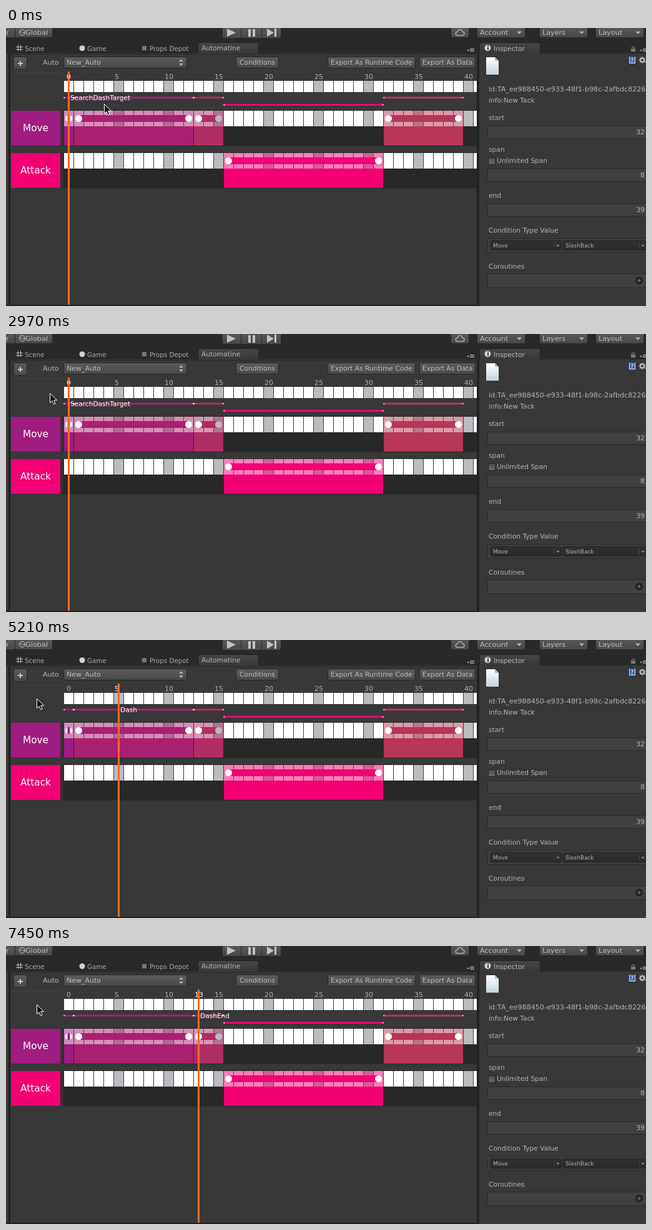
Recreate the animation shown at these times as an HTML page with a canvas. Size 1025 px wide and 447 px high, loop 8 s.

```html
<!DOCTYPE html>
<html lang="en">
<head>
<meta charset="utf-8">
<title>Timeline editor</title>
<style>
html, body { margin: 0; width: 100%; height: 100%; overflow: hidden; background: #383838; }
canvas { display: block; }
</style>
</head>
<body>
<canvas id="stage" width="1025" height="447"></canvas>
<script>
const W = 1025, H = 447, LOOP = 8000;
const LEFT = 93, RIGHT = 754, CELL = 16;
const FONT = '"DejaVu Sans", Verdana, sans-serif';
const screen = document.getElementById('stage').getContext('2d');

const spans = [
  { from: 0, to: 0, color: '#a01c80', row: 133, strip: 112 },
  { from: 1, to: 12, color: '#a92070', row: 133, strip: 112 },
  { from: 13, to: 15, color: '#b02c64', row: 133, strip: 112 },
  { from: 32, to: 39, color: '#b83656', row: 133, strip: 112 },
  { from: 16, to: 31, color: '#f20074', row: 201, strip: 123.5 }
];

// pointer: time, x, y
const pointer = [
  [0, 157, 122], [150, 162, 122], [300, 178, 121], [450, 196, 119],
  [590, 209, 118], [740, 216, 117], [1480, 175, 122], [1630, 125, 124],
  [1780, 92, 123], [1920, 74, 120], [2070, 60, 112], [2220, 66, 104],
  [2370, 82, 99], [2520, 96, 97], [2970, 70, 95], [3120, 49, 94]
];
const ticks = [3860, 4310, 4610, 4910, 5210, 5510, 5810, 6100, 6400, 6700, 7000, 7150, 7450];

let g;
const cellX = n => LEFT + CELL * n;

function rect(x, y, w, h, color) {
  g.fillStyle = color;
  g.fillRect(x, y, w, h);
}

function text(s, x, y, color = '#b4b4b4', size = 10.7, align = 'left') {
  g.font = size + 'px ' + FONT;
  g.textAlign = align;
  g.fillStyle = color;
  g.fillText(s, x, y);
}

function dot(x, y, r, color) {
  g.fillStyle = color;
  g.beginPath();
  g.arc(x, y, r, 0, Math.PI * 2);
  g.fill();
}

function poly(points, color) {
  g.fillStyle = color;
  g.beginPath();
  points.forEach(([x, y]) => g.lineTo(x, y));
  g.closePath();
  g.fill();
}

function fade(y, h, top, bottom) {
  const f = g.createLinearGradient(0, y, 0, y + h);
  f.addColorStop(0, top);
  f.addColorStop(1, bottom);
  return f;
}

function button(x, y, w, h, top = '#5c5c5c', bottom = '#484848') {
  g.beginPath();
  g.roundRect(x + .5, y + .5, w - 1, h - 1, 3);
  g.fillStyle = fade(y, h, top, bottom);
  g.fill();
  g.strokeStyle = '#272727';
  g.lineWidth = 1;
  g.stroke();
}

function tab(x, w) {
  g.beginPath();
  g.roundRect(x + .5, 23.5, w, 20, [3, 3, 0, 0]);
  g.fillStyle = fade(23, 18, '#464646', '#383838');
  g.fill();
  g.strokeStyle = '#202020';
  g.lineWidth = 1;
  g.stroke();
}

const arrow = (x, y, s, color = '#b0b0b0') =>
  poly([[x - s, y - s / 2], [x + s, y - s / 2], [x, y + s / 2 + .5]], color);

function menu(x, y) {
  arrow(x, y, 2);
  for (let i = 0; i < 3; i++) rect(x + 3, y - 3 + i * 2, 7, 1, '#b0b0b0');
}

function toolbar() {
  rect(0, 0, W, 22, '#292929');
  button(-6, -6, 22, 22);
  text('r', 0, 11, '#b4b4b4', 11.2);
  button(14, -6, 61, 22);
  g.strokeStyle = '#c8c8c8';
  g.lineWidth = 1;
  g.beginPath();
  g.arc(26, 7, 4.5, 0, 7);
  g.moveTo(22, 6); g.lineTo(30, 8);
  g.stroke();
  dot(25, 6, 1.5, '#b04c40');
  text('Global', 31, 11, '#c0c0c0', 11.3);

  button(346, -6, 95, 23);
  rect(376, 0, 1, 16, '#2c2c2c');
  rect(409, 0, 1, 16, '#2c2c2c');
  poly([[354, 1], [368, 7.5], [354, 14]], '#c4c4c4');
  rect(388, 2, 4, 12, '#c4c4c4');
  rect(395, 2, 4, 12, '#c4c4c4');
  poly([[418, 1], [429, 7.5], [418, 14]], '#c4c4c4');
  rect(430, 1, 3, 13, '#c4c4c4');

  button(712, -6, 30, 22);
  g.strokeStyle = '#c0c0c0';
  g.lineWidth = 1.2;
  g.beginPath();
  g.arc(723, 9, 2.8, Math.PI / 2, Math.PI * 1.5);
  g.arc(727, 6.3, 3.8, Math.PI * 1.05, Math.PI * 1.95);
  g.arc(731.3, 9.1, 2.7, -Math.PI / 2, Math.PI / 2);
  g.closePath();
  g.stroke();
  [['Account', 754], ['Layers', 854], ['Layout', 944]].forEach(([s, x]) => {
    button(x, -6, 78, 22);
    text(s, x + 5, 11, '#bebebe', 11.2);
    arrow(x + 68, 7.5, 4);
  });
}

function tabs() {
  rect(0, 22, W, 19, '#292929');
  tab(307, 97);
  tab(758, 97);
  for (let i = 0; i < 2; i++) {
    rect(19 + i * 4, 27, 1, 10, '#c0c0c0');
    rect(16, 30 + i * 4, 11, 1, '#c0c0c0');
  }
  text('Scene', 30, 37, '#a8a8a8', 10.3);
  dot(122, 32.5, 4.5, '#d0d0d0');
  text('Game', 130, 37, '#a8a8a8', 10.3);
  rect(218, 29, 7, 7, '#777');
  text('Props Depot', 230, 37, '#a8a8a8', 10.3);
  text('Automatine', 313, 36, '#b8b8b8');
  dot(771.5, 32, 5, '#d4d4d4');
  rect(771, 31, 2, 4, '#333');
  rect(771, 28, 2, 2, '#333');
  text('Inspector', 781, 37, '#b8b8b8');
  menu(740, 36);
  menu(1017, 36);
  rect(1001, 33, 7, 5, '#777');
  g.strokeStyle = '#777';
  g.lineWidth = 1.2;
  g.beginPath();
  g.arc(1004.5, 32.5, 2.3, Math.PI, 0);
  g.stroke();
}

function cells(y, h) {
  rect(LEFT, y, RIGHT - LEFT, h, '#3a3a42');
  for (let n = 0; cellX(n) < RIGHT; n++)
    rect(cellX(n), y, Math.min(CELL - 1, RIGHT - cellX(n)), h, n && n % 5 === 0 ? '#bbbbc0' : '#fff');
}

function track(name, y, color) {
  rect(7, y - 1, RIGHT - 7, 58, '#282828');
  rect(7, y - 1, 85, 58, '#333');
  rect(8, y, 79, 56, color);
  text(name, 47.5, y + 33, '#fff', 15.3, 'center');
  cells(y, 25);
}

function drawSpan({ from, to, color, row, strip }) {
  const x = cellX(from), w = (to - from + 1) * CELL - 1;
  const a = x + 7.5, b = cellX(to) + 7.5, y = row + 12.5;
  g.globalAlpha = .5;
  rect(x, row, w, 25, color);
  g.globalAlpha = 1;
  rect(x, row + 25, w, 31, color);
  if (from === to) {
    dot(a, y, 5.5, '#fff');
    rect(a - 2, y - 5.5, 4, 11, color);
  } else {
    rect(a, y - 5.5, b - a, 11, color);
    dot(a, y, 5.5, '#fff');
    dot(b, y, 5.5, to === 15 ? '#bbbbc0' : '#fff');
  }
  rect(x, strip - 1.5, w, 3, color);
  rect(x - .5, strip - 1, 1.5, 2, '#fff');
  rect(x + w - 1, strip - 1, 1.5, 2, '#fff');
}

function editor() {
  rect(7, 41, 747, 404, '#383838');
  g.strokeStyle = '#2a2a2a';
  g.lineWidth = 1;
  g.strokeRect(9.5, 42.5, 745, 30);
  rect(10, 72, 82, 1, '#444');
  rect(93, 70, 661, 15, '#383838');
  button(12, 46, 22, 21);
  rect(19, 56, 8, 2, '#c4c4c4');
  rect(22, 53, 2, 8, '#c4c4c4');
  text('Auto', 59, 59, '#b4b4b4', 11);
  button(92, 46, 198, 19);
  text('New_Auto', 97, 59, '#bebebe', 11);
  poly([[277, 54], [284, 54], [280.5, 50]], '#b0b0b0');
  poly([[277, 57], [284, 57], [280.5, 61]], '#b0b0b0');
  [['Conditions', 368, 69], ['Export As Runtime Code', 515, 141], ['Export As Data', 662, 90]]
    .forEach(([s, x, w]) => {
      button(x, 46, w, 19);
      text(s, x + w / 2, 59, '#bebebe', 10.75, 'center');
    });
  cells(85, 18);
  track('Move', 133, '#a01c80');
  track('Attack', 201, '#f20074');
  spans.forEach(drawSpan);
}

function field(y, h, value) {
  rect(771, y, 254, h, '#2a2a2a');
  rect(772, y + 1, 253, h - 2, '#404040');
  if (value) text(value, 1023, y + 14, '#b4b4b4', 10.9, 'right');
}

function inspector() {
  rect(758, 41, 267, 406, '#383838');
  poly([[769, 47], [783, 47], [789, 53], [789, 75], [769, 75]], fade(47, 28, '#fff', '#c3d5df'));
  poly([[783, 47], [789, 53], [783, 53]], '#aebfca');
  rect(998, 46, 10, 11, '#dfe6f0');
  rect(999, 46, 8, 10, '#3b68b0');
  text('?', 1003, 55, '#fff', 9, 'center');
  g.strokeStyle = '#bcbcbc';
  g.lineWidth = 2;
  g.beginPath();
  g.arc(1019, 51.5, 3, 0, 7);
  for (let a = 0; a < 8; a++) {
    const c = Math.cos(a * Math.PI / 4), s = Math.sin(a * Math.PI / 4);
    g.moveTo(1019 + c * 3, 51.5 + s * 3);
    g.lineTo(1019 + c * 5, 51.5 + s * 5);
  }
  g.stroke();
  arrow(1025, 55, 2);

  text('id:TA_ee988450-e933-48f1-b98c-2afbdc8226', 773, 102, '#b4b4b4', 11.1);
  text('info:New Tack', 773, 120);
  text('start', 773, 148);
  field(157, 21, '32');
  text('span', 773, 199);
  g.fillStyle = fade(208, 11, '#4c4c4c', '#666');
  g.fillRect(773, 208, 11, 11);
  g.strokeStyle = '#242424';
  g.lineWidth = 1;
  g.strokeRect(772.5, 208.5, 11, 11);
  text('Unlimited Span', 786, 217, '#b4b4b4', 10.6);
  field(226, 21, '8');
  text('end', 773, 273);
  field(282, 21, '39');
  text('Condition Type Value', 773, 329);
  field(338, 23);
  [['Move', 775, 115], ['SlashBack', 891, 138]].forEach(([s, x, w]) => {
    button(x, 341, w, 17, '#303030', '#2a2a2a');
    text(s, x + 5, 353, '#b4b4b4', 8.9);
    const end = Math.min(x + w - 6, 1020);
    arrow(end, 350, 2.5, '#999');
    rect(end - 6, 344, 1, 11, '#444');
  });
  text('Coroutines', 773, 387);
  field(395, 23);
  dot(1014, 406, 6, '#222');
  rect(1011, 405.5, 6, 1, '#888');
  rect(1013.5, 403, 1, 6, '#888');
}

function backdrop() {
  rect(0, 0, W, H, '#222');
  toolbar();
  tabs();
  rect(0, 41, 4, 404, '#383838');
  editor();
  inspector();
}

function playhead(n) {
  for (let k = 0; k <= 40; k += 5)
    if (k !== n) text(k, k ? cellX(k) + 1 : 97, 82, '#b0b0b0', 10.9);
  text(n, n ? cellX(n) + 1 : 97, 82, '#fff', 10.9);
  rect(cellX(n) + 6, 70, 3, 375, '#f26b2c');
  const label = n === 0 ? 'SearchDashTarget' : n < 13 ? 'Dash' : 'DashEnd';
  text(label, cellX(n) + 10, 116, '#fff', 10.6);
}

function cursor(x, y) {
  const shape = [[0, 0], [0, 15], [3.5, 11.8], [6, 17.5], [8.6, 16.4], [6.2, 10.8], [11, 10.8]];
  g.save();
  g.translate(x + .5, y + .5);
  poly(shape, '#111');
  g.strokeStyle = '#fff';
  g.lineWidth = 1;
  g.stroke();
  g.restore();
}

const back = document.createElement('canvas');
back.width = W;
back.height = H;
g = back.getContext('2d');
backdrop();
g = screen;

function draw() {
  const t = performance.now() % LOOP;
  g.drawImage(back, 0, 0);
  playhead(ticks.filter(at => at <= t).length);
  const [, x, y] = pointer.filter(p => p[0] <= t).pop();
  cursor(x, y);
  requestAnimationFrame(draw);
}
draw();
</script>
</body>
</html>
```
